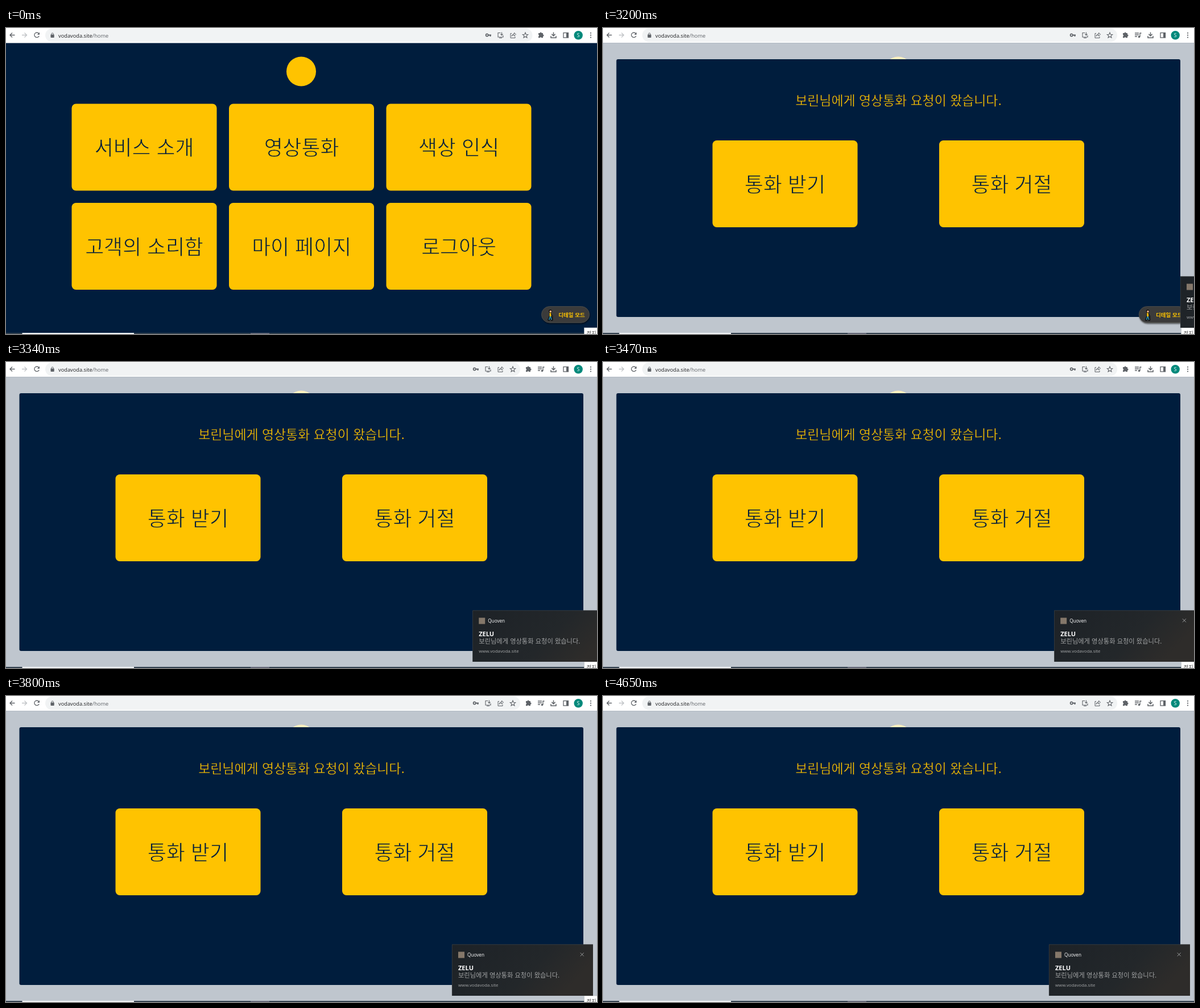
These frames come from a looping animation (1039 by 539 pixels, 5450 ms). An HTML page:

```html
<!DOCTYPE html>
<html lang="ko">
<head>
<meta charset="utf-8">
<title>Home</title>
<style>
  html, body { margin: 0; width: 100%; height: 100%; overflow: hidden; background: #001d3d; }
  svg { display: block; width: 100vw; height: 100vh; }
  text { font-family: 'Noto Sans CJK KR', 'Noto Sans CJK', sans-serif; white-space: pre; }
  .ui { font-family: 'Open Sans', 'Noto Sans', sans-serif; }
  /* a stroke in the background colour thins the letters to a light weight */
  .label { font-size: 35.8px; text-anchor: middle; fill: #001d3d; stroke: #ffc300; stroke-width: .8; }
  .heading { font-size: 22.9px; text-anchor: middle; fill: #ffc300; stroke: #001d3d; stroke-width: .35; }
  .line { fill: none; stroke: #5f6368; stroke-width: 1.3; }
  .solid { fill: #5f6368; }
</style>
</head>
<body>
<svg viewBox="0 0 1039 539" lang="ko">
  <defs>
    <linearGradient id="toastFill" x1="0" y1="0" x2="1" y2=".35">
      <stop offset="0" stop-color="#1d2227"/>
      <stop offset=".65" stop-color="#23272a"/>
      <stop offset="1" stop-color="#2e2c2a"/>
    </linearGradient>
    <filter id="shadow" x="-20%" y="-40%" width="140%" height="200%">
      <feDropShadow dx=".8" dy="1.8" stdDeviation="1.2" flood-color="#000" flood-opacity=".6"/>
    </filter>
  </defs>

  <!-- page -->
  <rect width="1039" height="539" fill="#001d3d"/>
  <circle cx="519" cy="76.5" r="26" fill="#ffc300"/>
  <g id="menu"></g>

  <!-- incoming call -->
  <g id="call">
    <rect y="26.500" width="1039" height="512.500" fill="#fff" fill-opacity=".75"/>
    <rect x="23.5" y="55" width="991.5" height="454" rx="3" fill="#001d3d"/>
    <text class="heading" x="519.5" y="136">보린님에게 영상통화 요청이 왔습니다.</text>
    <g id="answers"></g>
  </g>

  <!-- detail mode button -->
  <g id="detail">
    <rect x="941.5" y="490.5" width="84" height="28.5" rx="14.2" fill="#3a3a3a" stroke="#55534f" stroke-width=".8" filter="url(#shadow)"/>
    <g fill="none" stroke-linecap="round" stroke-linejoin="round">
      <path d="M957 501.500V507M957 507L954.300 514M957 507L959.500 514" stroke="#111" stroke-width="4"/>
      <path d="M957 507L954.800 513.500M957 507L959 513.500" stroke="#258bb0" stroke-width="1.700"/>
      <path d="M957 502.500V507" stroke="#ffc300" stroke-width="2.800"/>
      <path d="M958 503L961 507V514" stroke="#111" stroke-width="1"/>
    </g>
    <circle cx="957" cy="498.7" r="2.8" fill="#111"/>
    <circle cx="957.3" cy="499.2" r="1.7" fill="#f1b58b"/>
    <text x="994.5" y="508.8" text-anchor="middle" font-size="9.5" font-weight="700" fill="#ffc300">디테일 모드</text>
  </g>

  <!-- browser bar -->
  <rect width="1039" height="26.500" fill="#fff"/>
  <rect id="pill" x="69" y="1" height="23.5" rx="11.75" fill="#f1f3f4"/>
  <path class="line" d="M15.500 12.500H7M11 8.500L7 12.500L11 16.500"/>
  <path class="line" style="stroke:#bfc2c5" d="M28 12.500H36.500M32.500 8.500L36.500 12.500L32.500 16.500"/>
  <path class="line" d="M57.600 9.600A4.300 4.300 0 1 0 58.200 14"/>
  <path class="solid" d="M59 7.500V11.700H54.800Z"/>
  <rect class="solid" x="78.500" y="11.500" width="6.200" height="5.500" rx=".7"/>
  <path class="line" style="stroke-width:1" d="M79.900 12V10.600A1.700 1.700 0 0 1 83.300 10.600V12"/>
  <text class="ui" x="92" y="16.500" font-size="9.25" fill="#202124">vodavoda.site<tspan fill="#5f6368">/home</tspan></text>

  <g id="tools">
    <g transform="translate(848 12.500)">
      <circle class="line" cx="-2.300" r="2.100" style="stroke-width:1.700"/>
      <path class="line" style="stroke-width:1.800" d="M0 0H5M3.500 0V2.500"/>
    </g>
    <path class="line" style="stroke-width:1.100" d="M869.500 8.500H865V16H874V13M867 17.500H872M871.500 7.500V12.500M869.300 10.600L871.500 12.800L873.700 10.600"/>
    <path class="line" style="stroke-width:1" d="M889 9.500H887V17.500H895V15M889 14.500C889.500 11.500 891.500 10.500 893.500 10.500V8.200L896.500 11.300L893.500 14.200V12.300C891.500 12.300 890 13 889 14.500Z"/>
    <path id="star" class="line" style="stroke-width:1.100"/>
    <path class="solid" d="M936 9H938.500A1.600 1.600 0 0 1 941.700 9H944V11.500A1.600 1.600 0 0 1 944 14.700V17.300H941.500A1.600 1.600 0 0 0 938.500 17.300H936V14.700A1.600 1.600 0 0 0 936 11.700Z"/>
  </g>
  <g id="playlist">
    <path class="line" d="M935 9H942M935 12H942M935 15H939M944 15.500V9H946.500"/>
    <circle class="solid" cx="942.500" cy="15.500" r="1.800"/>
  </g>
  <path class="line" style="stroke-width:1.500" d="M962.500 7.500V13.500M959.300 10.700L962.500 13.900L965.700 10.700M958 14V17.200H967V14"/>
  <rect class="line" x="980" y="8.500" width="8.500" height="8.500"/>
  <rect class="solid" x="985" y="8.500" width="3.500" height="8.500"/>
  <circle cx="1006.200" cy="12.700" r="7.700" fill="#00897b"/>
  <text class="ui" x="1006.200" y="15.800" text-anchor="middle" font-size="8.500" fill="#fff">S</text>
  <g class="solid"><circle cx="1028" cy="8.800" r="1.100"/><circle cx="1028" cy="12.700" r="1.100"/><circle cx="1028" cy="16.600" r="1.100"/></g>

  <!-- taskbar edge -->
  <rect y="537" width="1039" height="2" fill="#33414f"/>
  <rect x="28.500" y="537" width="196.500" height="2" fill="#f4f6f8"/>
  <rect x="430" y="537" width="33" height="2" fill="#656878"/>

  <g id="tooltip">
    <rect x="1016.500" y="528" width="24" height="12" fill="#fff" stroke="#b5b8bb" stroke-width=".6"/>
    <text x="1020.800" y="540.500" font-size="9.200" fill="#444">정지</text>
  </g>

  <!-- notification, laid out from its left edge -->
  <g id="toast">
    <rect y="437.500" width="248" height="90.500" fill="url(#toastFill)"/>
    <path d="M.3 528V437.800H248" fill="none" stroke="#45484a" stroke-width=".6"/>
    <rect x="11" y="450.500" width="11" height="11" fill="#85786a"/>
    <text class="ui" x="27" y="458.800" font-size="8.200" fill="#fff">Quoven</text>
    <path d="M225.700 452.300L231.700 458.300M231.700 452.300L225.700 458.300" stroke="#a9abac" stroke-width=".9"/>
    <text class="ui" x="11" y="483" font-size="11" font-weight="700" fill="#fff">ZELU</text>
    <text x="11" y="496.200" font-size="11.250" fill="#a0a2a3">보린님에게 영상통화 요청이 왔습니다.</text>
    <text class="ui" x="11" y="511.500" font-size="7.800" fill="#a5a7a8">www.vodavoda.site</text>
  </g>
</svg>
<script>
  const LOOP = 5450, CALL = 2860, SLIDE = 3200, FADE = 4390, STEP = 66.25;
  const $ = id => document.getElementById(id);
  const steps = (t, from) => Math.floor((t - from + 5) / STEP);

  const card = (x, y, label) =>
    `<rect x="${x}" y="${y}" width="255" height="153" rx="7.5" fill="#ffc300"/>` +
    `<text class="label" x="${x + 127.5}" y="${y + 90.5}">${label}</text>`;

  $('menu').innerHTML = ['서비스 소개', '영상통화', '색상 인식', '고객의 소리함', '마이 페이지', '로그아웃']
    .map((label, i) => card(115.5 + 276.5 * (i % 3), i < 3 ? 133.5 : 308, label)).join('');
  $('answers').innerHTML = card(192.5, 198, '통화 받기') + card(591, 198, '통화 거절');

  $('star').setAttribute('d', 'M' + Array.from({ length: 10 }, (_, i) => {
    const r = i % 2 ? 2.2 : 5, a = i * Math.PI / 5;
    return `${913 + r * Math.sin(a)} ${13 - r * Math.cos(a)}`;
  }).join('L') + 'Z');

  const show = (id, on) => $(id).setAttribute('display', on ? 'inline' : 'none');
  const shift = (id, x) => $(id).setAttribute('transform', `translate(${x} 0)`);

  function draw(t) {
    const calling = t >= CALL;
    show('call', calling);
    show('playlist', calling);
    shift('tools', calling ? -22 : 0);
    shift('detail', calling ? 0.7 : 0);
    $('pill').setAttribute('width', calling ? 835 : 856.5);

    // notification slides in on coarse steps, decelerating
    show('toast', t >= SLIDE);
    const k = Math.max(0, steps(t, SLIDE));
    shift('toast', 784 + (k < 8 ? 231 * Math.exp(-1.064 * k ** 0.8) : 0));

    const faded = t < FADE ? 0 : Math.min(1, (steps(t, FADE) + 1) / 5);
    $('tooltip').setAttribute('opacity', 1 - faded);
  }

  const start = performance.now();
  function tick() {
    draw((performance.now() - start) % LOOP);
    requestAnimationFrame(tick);
  }
  tick();
</script>
</body>
</html>
```
